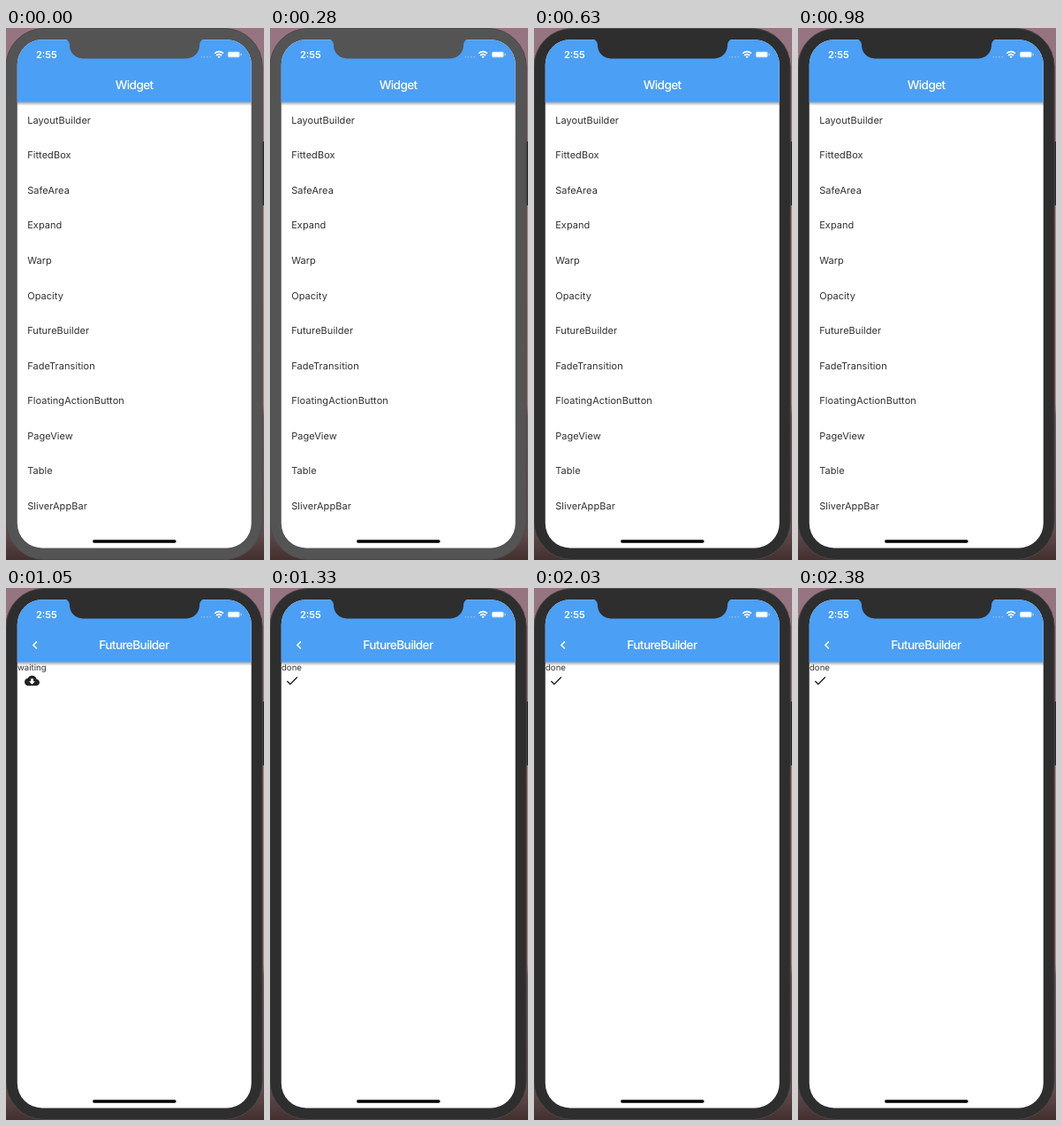
An HTML page for the animation above (2.52 s loop, 292 px wide and 600 px high).

```html
<!DOCTYPE html>
<html lang="en">
<head>
<meta charset="utf-8">
<style>
  html, body { margin: 0; height: 100%; overflow: hidden; }
  svg { display: block; width: 292px; height: 600px; font-family: Inter, Roboto, sans-serif; text-rendering: geometricPrecision; }
  .title { font-size: 13.6px; font-weight: 500; letter-spacing: -.6px; fill: #fff; text-anchor: middle; }
  #list { font-size: 11px; letter-spacing: .05px; fill: #303030; }
  #state { font-size: 9.6px; fill: #333; }
</style>
</head>
<body>
<svg viewBox="0 0 292 600">
  <defs>
    <linearGradient id="sky" x2="0" y2="1">
      <stop offset="0" stop-color="#957481"/>
      <stop offset=".3" stop-color="#a0747a"/>
      <stop offset=".34" stop-color="#b5827c"/>
      <stop offset=".71" stop-color="#b08078"/>
      <stop offset=".73" stop-color="#77595c"/>
      <stop offset=".94" stop-color="#654d4e"/>
      <stop offset="1" stop-color="#43302f"/>
    </linearGradient>
    <linearGradient id="shade" x2="0" y2="1">
      <stop offset="0" stop-opacity=".34"/>
      <stop offset="1" stop-opacity="0"/>
    </linearGradient>
    <clipPath id="screen"><rect x="12.8" y="13.2" width="264.9" height="573.3" rx="28"/></clipPath>
  </defs>

  <rect width="292" height="600" fill="url(#sky)"/>
  <rect x="289" y="128" width="3" height="72" fill="#292929"/>
  <rect class="bezel" x="0" y=".5" width="290.2" height="599" rx="43" stroke="#494949"/>

  <g clip-path="url(#screen)">
    <rect width="292" height="600" fill="#fff"/>
    <rect width="292" height="83.7" fill="#4b9ff5"/>
    <rect y="83.7" width="292" height="4" fill="url(#shade)"/>
    <g id="home">
      <text class="title" x="145.2" y="69.3">Widget</text>
      <g id="list"></g>
    </g>
    <g id="page">
      <text class="title" x="145" y="69.3">FutureBuilder</text>
      <path d="M35 60.3l-4.1 4.1 4.1 4.1" fill="none" stroke="#fff" stroke-width="1.5"/>
      <text id="state" x="13" y="93.4"></text>
      <path id="icon" fill="#222"/>
    </g>
  </g>
  <path class="bezel" d="M66 12.5a6 7 0 0 1 6 7a15 15 0 0 0 15 15h117a15 15 0 0 0 15-15a6 7 0 0 1 6-7z"/>

  <g fill="#fff">
    <text x="34" y="33.8" font-size="11" font-weight="600">2:55</text>
    <g id="dots" opacity=".4">
      <circle cx="221.3" cy="32.7" r=".8"/><circle cx="224.6" cy="32.7" r=".8"/>
      <circle cx="227.9" cy="32.7" r=".8"/><circle cx="231.2" cy="32.7" r=".8"/>
    </g>
    <path d="M236.2 28.7q4.9-4.2 9.8 0M238 30.9q3.1-2.6 6.2 0" fill="none" stroke="#fff" stroke-width="1.6"/>
    <path d="M239.5 32.2q1.6-1.2 3.2 0l-1.6 1.8z"/>
    <rect x="250.7" y="26.4" width="14.2" height="7" rx="2" opacity=".4"/>
    <rect x="251.6" y="27.3" width="12.4" height="5.2" rx="1.2"/>
    <rect x="265.5" y="28.6" width="1.2" height="2.6" rx=".6" opacity=".6"/>
  </g>
  <rect x="98" y="577.2" width="94.6" height="3.5" rx="1.75"/>
</svg>
<script>
const $ = id => document.getElementById(id);
const LOOP = 2520, ACTIVE = 630, OPEN = 1050, DONE = 1260;
const names = ['LayoutBuilder', 'FittedBox', 'SafeArea', 'Expand', 'Warp', 'Opacity', 'FutureBuilder',
  'FadeTransition', 'FloatingActionButton', 'PageView', 'Table', 'SliverAppBar'];
const cloud = 'M19.35 10.04C18.67 6.59 15.64 4 12 4 9.11 4 6.6 5.64 5.35 8.04 2.34 8.36 0 10.91 0 14' +
  'c0 3.31 2.69 6 6 6h13c2.76 0 5-2.24 5-5 0-2.64-2.05-4.78-4.65-4.96zM17 13l-5 5-5-5h3V9h4v4z';
const check = 'M9 16.17 4.83 12l-1.42 1.41L9 19 21 7l-1.41-1.41z';

$('list').innerHTML = names.map((name, i) =>
  `<text x="24.2" y="${107.9 + i * 39.53}">${name}</text>`).join('');

const show = (id, on) => $(id).style.display = on ? '' : 'none';

function draw(now) {
  const t = now % LOOP, done = t >= DONE;
  for (const el of document.querySelectorAll('.bezel'))
    el.setAttribute('fill', t < ACTIVE ? '#545454' : '#2e2e2e');
  show('dots', t < 560 || t >= ACTIVE);
  show('home', t < OPEN);
  show('page', t >= OPEN);
  $('state').textContent = done ? 'done' : 'waiting';
  $('icon').setAttribute('d', done ? check : cloud);
  $('icon').setAttribute('transform', `translate(${done ? 16.5 : 21} 96) scale(.707)`);
}

const start = performance.now();
function tick() {
  draw(performance.now() - start);
  requestAnimationFrame(tick);
}
tick();
</script>
</body>
</html>
```
